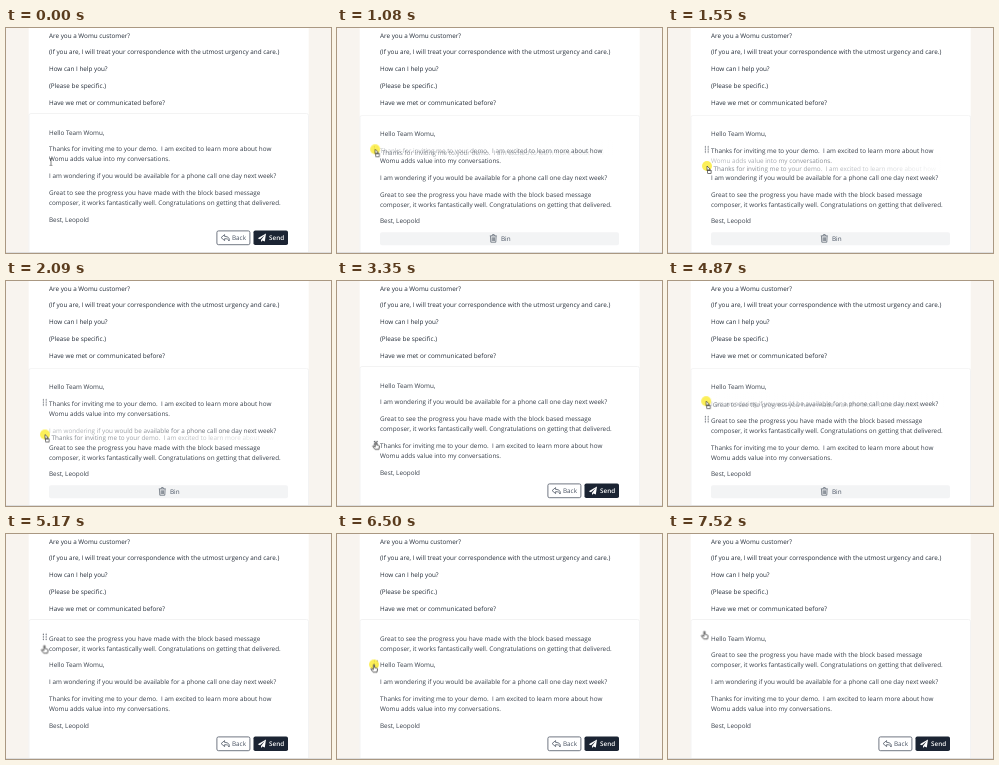
Write an HTML page that moves like this. It is 325 px wide and 225 px high and loops after 8000 ms.

```html
<!DOCTYPE html>
<html lang="en">
<head>
<meta charset="utf-8">
<title>Block composer</title>
<style>
html, body { margin: 0; width: 100%; height: 100%; overflow: hidden; background: #f8f4ef; }
svg { display: block; width: 100vw; height: 100vh; }
text {
  font-family: "Open Sans", "Noto Sans", sans-serif;
  font-size: 6.33px; fill: #242d39; white-space: pre;
  text-rendering: geometricPrecision;
}
.composer text { fill: #363e49; }
.buttons text, .bin text { fill: #465060; }
.buttons .send { font-weight: 600; fill: #fff; }
.ghost text { fill: url(#ink); }

/* every state switch is a hard cut on the same 8 s clock */
.composer, .block, .handle, .bin, .buttons, .press, .beam, .hand, .grab, .ghost {
  animation: 8s step-end infinite;
}
.composer { animation-name: shift; }
.block { animation-name: order; }
.handle { animation-name: hover; }
.bin, .grab { animation-name: dragging; }
.buttons { animation-name: resting; }
.press { animation-name: press; }
.beam { animation-name: beam; }
.hand { animation-name: hand; }
.g1 { animation-name: ghost1; }
.g2 { animation-name: ghost2; }
.g3 { animation-name: ghost3; }
.cursor { animation: move 8s linear infinite; }

@keyframes shift {
  0%, 31.05%, 64.6%, 93.97%, 100% { transform: none; }
  13.5%, 56.25%, 84.1% { transform: translateY(1.8px); }
}
@keyframes order {
  0% { transform: translateY(var(--a)); }
  31.05% { transform: translateY(var(--b)); }
  64.6% { transform: translateY(var(--c)); }
  93.97%, 100% { transform: translateY(var(--d)); }
}
@keyframes hover {
  0% { opacity: 0; transform: translateY(119.6px); }
  4.9% { opacity: 1; transform: translateY(119.6px); }
  31.05% { opacity: 1; transform: translateY(163.1px); }
  46% { opacity: 1; transform: translateY(136.5px); }
  64.6% { opacity: 1; transform: translateY(102.8px); }
  77.3% { opacity: 1; transform: translateY(129.6px); }
  93.97%, 100% { opacity: 0; transform: translateY(103px); }
}
@keyframes dragging {
  0%, 31.05%, 64.6%, 93.97%, 100% { opacity: 0; }
  13.5%, 56.25%, 84.1% { opacity: 1; }
}
@keyframes resting {
  0%, 31.05%, 64.6%, 93.97%, 100% { opacity: 1; }
  13.5%, 56.25%, 84.1% { opacity: 0; }
}
@keyframes press {
  0%, 31.05%, 64.6%, 93.97%, 100% { opacity: 0; }
  10.6%, 54.1%, 81.2% { opacity: 1; }
}
@keyframes beam {
  0% { opacity: 1; }
  3.9%, 100% { opacity: 0; }
}
@keyframes hand {
  0%, 13.5%, 56.25%, 84.1% { opacity: 0; }
  3.9%, 31.05%, 64.6%, 93.97%, 100% { opacity: 1; }
}
@keyframes ghost1 { 0%, 31.05%, 100% { opacity: 0; } 13.5% { opacity: 1; } }
@keyframes ghost2 { 0%, 64.6%, 100% { opacity: 0; } 56.25% { opacity: 1; } }
@keyframes ghost3 { 0%, 93.97%, 100% { opacity: 0; } 84.1% { opacity: 1; } }

@keyframes move {
  0% { transform: translate(45px, 134px); }
  1% { transform: translate(45px, 134px); animation-timing-function: steps(7, start); }
  7.85%, 13.49% { transform: translate(38px, 118.5px); }
  13.5% { transform: translate(38px, 118.5px); animation-timing-function: steps(7, start); }
  20.3% { transform: translate(39px, 138px); animation-timing-function: steps(4, start); }
  24.2% { transform: translate(39.2px, 147px); animation-timing-function: steps(3, start); }
  27% { transform: translate(39px, 153.5px); animation-timing-function: steps(5, start); }
  31%, 41.8% { transform: translate(39px, 163px); }
  41.85% { transform: translate(39px, 163px); animation-timing-function: steps(11, start); }
  52.2%, 56.2% { transform: translate(37.5px, 137.5px); }
  56.25% { transform: translate(37.5px, 137.5px); animation-timing-function: steps(9, start); }
  64.55%, 75.3% { transform: translate(38.5px, 111.5px); }
  75.35% { transform: translate(38.5px, 111.5px); animation-timing-function: steps(4, start); }
  79.35%, 84.05% { transform: translate(37px, 130.5px); }
  84.1% { transform: translate(37px, 130.5px); animation-timing-function: steps(9, start); }
  92.8%, 100% { transform: translate(36.5px, 97.3px); }
}
</style>
</head>
<body>
<svg viewBox="0 0 325 225" preserveAspectRatio="none">
  <defs>
    <linearGradient id="fade">
      <stop offset="0" stop-color="#fff" stop-opacity=".68"/>
      <stop offset=".45" stop-color="#fff" stop-opacity=".42"/>
      <stop offset="1" stop-color="#fff" stop-opacity="0"/>
    </linearGradient>
    <linearGradient id="ink" gradientUnits="userSpaceOnUse" x1="0" x2="236">
      <stop offset="0" stop-color="#222b38" stop-opacity=".6"/>
      <stop offset=".45" stop-color="#222b38" stop-opacity=".42"/>
      <stop offset="1" stop-color="#222b38" stop-opacity="0"/>
    </linearGradient>
  </defs>

  <rect width="325" height="225" fill="#f8f4ef"/>
  <rect x="22.7" width="280" height="225" fill="#fff"/>

  <g transform="translate(43)">
    <text y="9.7">Are you a Womu customer?</text>
    <text y="26.4">(If you are, I will treat your correspondence with the utmost urgency and care.)</text>
    <text y="43.1">How can I help you?</text>
    <text y="59.8">(Please be specific.)</text>
    <text y="76.5">Have we met or communicated before?</text>
  </g>

  <g class="composer">
    <rect x="23" y="85.5" width="279.5" height="150" rx="2" fill="#fff" stroke="#f0f0f0" stroke-width=".8"/>
    <g transform="translate(43 2.5)">
      <g class="block" style="--a:104px;--b:104px;--c:130.8px;--d:104px">
        <text>Hello Team Womu,</text>
      </g>
      <g class="block" style="--a:120.75px;--b:164.3px;--c:164.3px;--d:164.3px">
        <text>Thanks for inviting me to your demo.  I am excited to learn more about how</text>
        <text y="10.05">Womu adds value into my conversations.</text>
      </g>
      <g class="block" style="--a:147.55px;--b:120.75px;--c:147.55px;--d:147.55px">
        <text>I am wondering if you would be available for a phone call one day next week?</text>
      </g>
      <g class="block" style="--a:164.3px;--b:137.5px;--c:104px;--d:120.75px">
        <text>Great to see the progress you have made with the block based message</text>
        <text y="10.05">composer, it works fantastically well. Congratulations on getting that delivered.</text>
      </g>
      <text y="191.1">Best, Leopold</text>
    </g>
    <path class="handle" d="M37.4-2.5h0M40.2-2.5h0M37.4 0h0M40.2 0h0M37.4 2.5h0M40.2 2.5h0" stroke="#5b616a" stroke-width="1.3" stroke-linecap="round"/>
  </g>

  <g class="buttons">
    <rect x="210.9" y="202.9" width="33" height="13.8" rx="1.6" fill="#fff" stroke="#4d5664" stroke-width=".8"/>
    <path d="M218.6 206.6l-3.5 3 3.5 3v-1.9c2.7-.1 4 .5 4.4 2.3 1-2.6-.6-4.5-4.4-4.6z" fill="none" stroke="#4d5664" stroke-width=".8" stroke-linejoin="round"/>
    <text x="226" y="212.2">Back</text>
    <rect x="247.5" y="202.5" width="34.5" height="14.5" rx="1.8" fill="#1b2433"/>
    <path d="M260 205.6l-8.2 4.7 2.1 1 4.7-4-3.6 4.6v2l1.4-1.5 2.4 1z" fill="#fff"/>
    <text class="send" x="263" y="212.2">Send</text>
  </g>

  <g class="bin">
    <rect x="43" y="204.3" width="239" height="13" rx="2" fill="#f3f4f5"/>
    <path d="M152.8 207.9h7M155 207.7l.5-1.1h1.7l.5 1.1M153.5 208.2l.3 6h5l.3-6M155.2 209.3v3.7M156.3 209.3v3.7M157.4 209.3v3.7" fill="none" stroke="#4d5664" stroke-width=".7"/>
    <text x="164" y="213.1">Bin</text>
  </g>

  <rect y="224" width="325" height="1" fill="#dedede"/>

  <g class="cursor">
    <g class="ghost g1">
      <rect x="1" y="-9" width="237" height="16" fill="url(#fade)"/>
      <text y="5.4" transform="translate(6.5)">Thanks for inviting me to your demo.  I am excited to learn more about how</text>
    </g>
    <g class="ghost g2">
      <rect x="1" y="-9" width="237" height="16" fill="url(#fade)"/>
      <text y="5.4" transform="translate(6.5)">Great to see the progress you have made with the block based message</text>
    </g>
    <g class="ghost g3">
      <rect x="1" y="-3" width="237" height="10" fill="url(#fade)"/>
      <text y="5.4" transform="translate(6.5)">Hello Team Womu,</text>
    </g>
    <circle class="press" r="5" fill="#fcec3c" fill-opacity=".85"/>
    <path class="beam" d="M-1.4-3.4h1l.4.4.4-.4h1M0-3v6M-1.4 3.4h1L0 3l.4.4h1" fill="none" stroke="#333" stroke-width=".6"/>
    <path class="hand" d="M-.7.5C-.7-.3.6-.3.6.5v2.6l2 .5c.8.2 1 .6.9 1.4L3 7.7H-.8L-3 4.9c-.4-.7.4-1.2 1-.7l1.3 1z" fill="#fff" stroke="#222" stroke-width=".7" stroke-linejoin="round"/>
    <g class="grab" fill="#fff" stroke="#222" stroke-width=".6">
      <path d="M0 0v4.6l1.1-1 .8 1.7.8-.4-.8-1.6h1.5z"/>
      <rect x=".7" y="4.6" width="3.4" height="2.8"/>
    </g>
  </g>
</svg>
</body>
</html>
```
